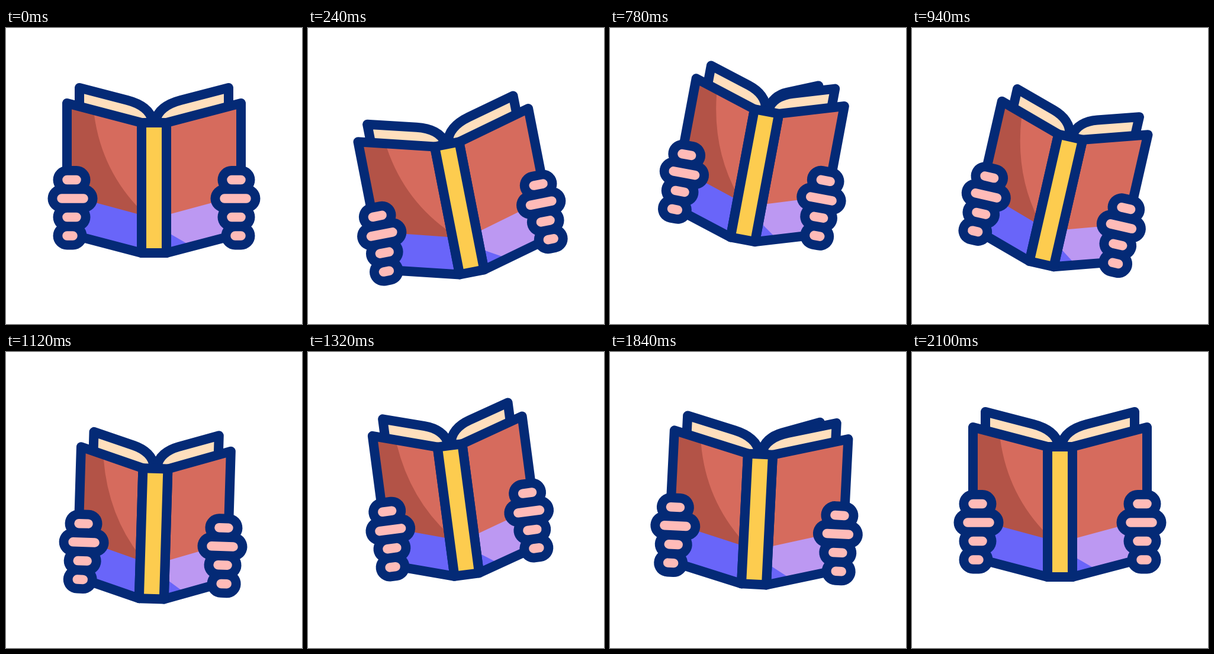
Animation of 500 by 500 pixels, one loop 2.4 s. Source, as an HTML page with a canvas:

```html
<!DOCTYPE html>
<html lang="en">
<head>
<meta charset="utf-8">
<title>Reading</title>
<style>
html, body { margin: 0; width: 100%; height: 100%; overflow: hidden; background: #fff; }
canvas { display: block; }
</style>
</head>
<body>
<canvas id="stage" width="500" height="500"></canvas>
<script>
const c = document.getElementById('stage').getContext('2d');
const LOOP = 2400;
const NAVY = '#042a76', RED = '#d66b5d', DARK = '#b35347', BLUE = '#6965f9',
  LILAC = '#bc98f2', CREAM = '#ffdfbd', YELLOW = '#fdcc4f', PINK = '#ffbbb8';

// [time, value] keys, eased in and out between neighbours
const TILT = [[0, 0], [400, -17], [880, 14], [1320, -7.5], [1700, 4], [2100, 0]];
const LIFT = [[0, 0], [340, 44], [720, -26], [1060, 41], [1425, -13.5], [1810, 13], [2100, 0]];
const CLOSE = [[180, 0], [860, 20.5], [1240, 20.5], [1860, 0]];

// A page turns twice per loop
const TURN_EVERY = 1050, TURN_START = 425, TURN_TIME = 467;

// [inner end, outer end] of each finger, measured from the middle of the book
const FINGERS = [[131, 147], [119, 156], [131, 147], [137, 147]];

function at(keys, t) {
  if (t <= keys[0][0]) return keys[0][1];
  for (let i = 1; i < keys.length; i++) {
    const [t0, a] = keys[i - 1], [t1, b] = keys[i];
    if (t < t1) {
      const p = (t - t0) / (t1 - t0);
      return a + (b - a) * p * p * (3 - 2 * p);
    }
  }
  return keys[keys.length - 1][1];
}

function poly(...points) {
  c.beginPath();
  points.forEach(([x, y]) => c.lineTo(x, y));
  c.closePath();
}

function fill(color) {
  c.fillStyle = color;
  c.fill();
}

function outline(color = NAVY, width = 16) {
  c.strokeStyle = color;
  c.lineWidth = width;
  c.stroke();
}

// Squeezes a path sideways about x without thinning its outline
function squeezed(x, k, trace) {
  c.save();
  c.translate(x, 0);
  c.scale(k, 1);
  c.translate(-x, 0);
  trace();
  c.restore();
}

function page(k) {
  squeezed(0, k, () => {
    c.beginPath();
    c.moveTo(3, 157);
    c.bezierCurveTo(5, 140, 22, 128, 45, 122);
    c.lineTo(126, 101);
    c.lineTo(126, 136);
    c.lineTo(21, 163);
    c.closePath();
  });
  fill(CREAM);
  outline();
}

function cover(k, left) {
  const shape = () => poly([21, 160], [147, 127], [147, 347], [21, 380]);
  squeezed(21, k, () => {
    shape();
    c.clip();
    fill(RED);
    if (left) {
      c.beginPath();
      c.moveTo(101, 120);
      c.lineTo(101, 147);
      c.quadraticCurveTo(88, 242, 21, 309);
      c.lineTo(21, 380);
      c.lineTo(150, 380);
      c.lineTo(150, 120);
      fill(DARK);
    }
    poly([21, 316], [147, 282], [147, 380], [21, 380]);
    fill(left ? BLUE : LILAC);
    if (!left) {
      poly([21, 344], [64, 369], [21, 380]);
      fill(BLUE);
    }
  });
  squeezed(21, k, shape);
  outline();
}

function hand(shift) {
  for (const [color, width] of [[NAVY, 47], [PINK, 15.5]]) {
    c.beginPath();
    FINGERS.forEach(([a, b], i) => {
      const y = 256.5 + 31.5 * i;
      c.moveTo(a - shift, y);
      c.lineTo(b - shift, y);
    });
    outline(color, width);
  }
}

function bothSides(draw) {
  for (const side of [-1, 1]) {
    c.save();
    c.scale(side, 1);
    draw(side < 0);
    c.restore();
  }
}

function draw(t) {
  const close = at(CLOSE, t);
  const pageScale = 1 - close / 127, coverScale = 1 - close / 126;
  c.fillStyle = '#fff';
  c.fillRect(0, 0, 500, 500);
  c.save();
  c.lineJoin = c.lineCap = 'round';
  c.translate(250, 240 + at(LIFT, t));
  c.rotate(at(TILT, t) * Math.PI / 180);
  c.translate(0, -240);

  const turn = (t % TURN_EVERY - TURN_START) / TURN_TIME;
  if (turn > 0 && turn < 1) page(-Math.cos(Math.PI * turn) * pageScale);
  bothSides(() => page(pageScale));
  bothSides(left => cover(coverScale, left));
  poly([-21, 160], [21, 160], [21, 380], [-21, 380]);
  fill(YELLOW);
  outline();
  bothSides(() => hand(close));
  c.restore();
}

function tick() {
  draw(performance.now() % LOOP);
  requestAnimationFrame(tick);
}
tick();
</script>
</body>
</html>
```
